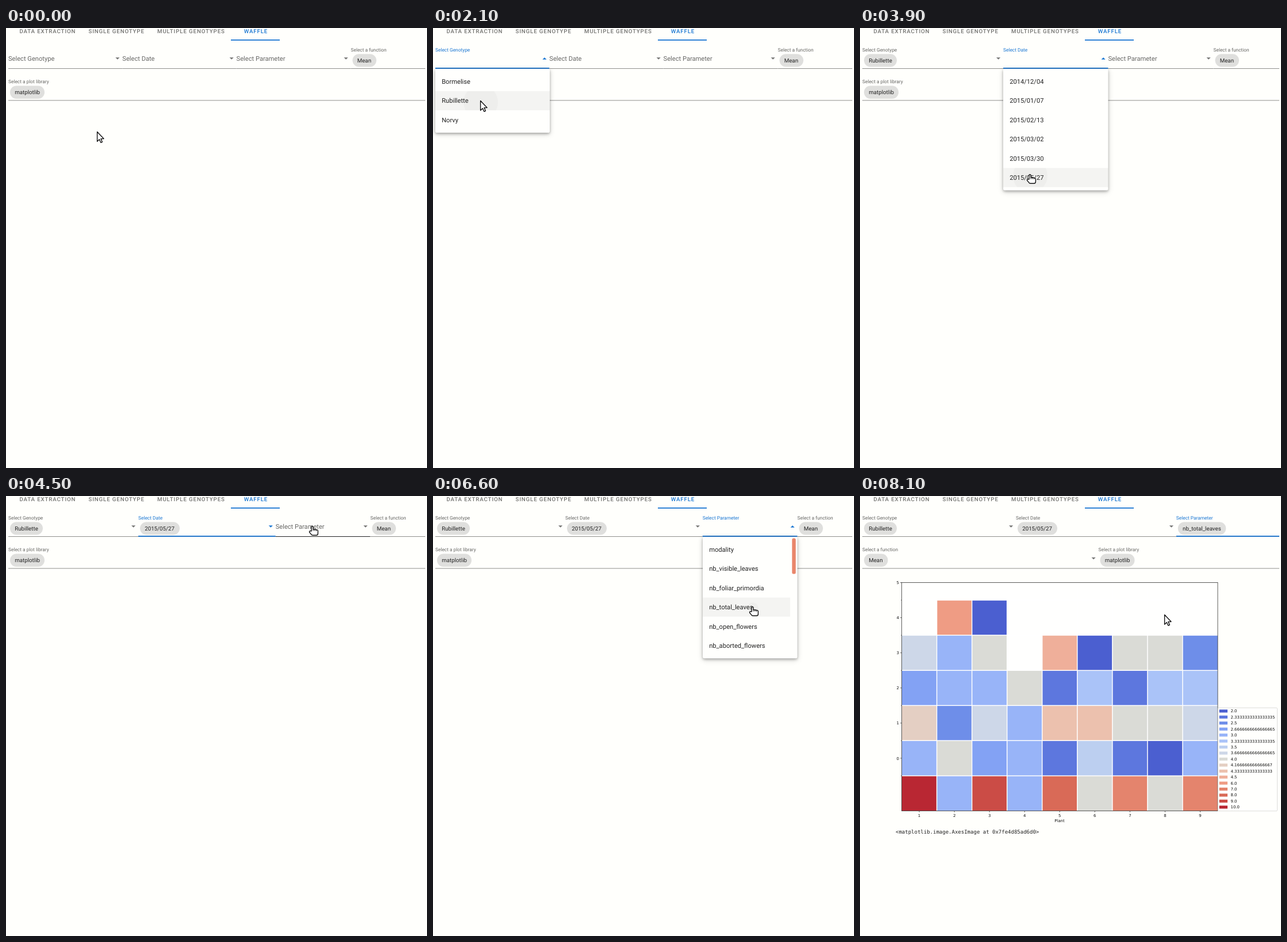
An HTML page for the animation above (8.7 s loop, 732 by 765 pixels).

```html
<!DOCTYPE html>
<html lang="en">
<head>
<meta charset="utf-8">
<title>Waffle plot form</title>
<style>
html, body { margin: 0; width: 100%; height: 100%; overflow: hidden; background: #fffffc; }
svg { display: block; width: 732px; height: 765px; font-family: Roboto, sans-serif; text-rendering: geometricPrecision; }
.tab { font-size: 9.74px; font-weight: 500; letter-spacing: .87px; fill: #747472; }
.chip { font-size: 9.74px; fill: #222; }
.item { font-size: 11.14px; fill: #222; }
.plot { font-family: "DejaVu Sans", sans-serif; font-size: 6.92px; fill: #111; }
.mono { font-family: "DejaVu Sans Mono", monospace; font-size: 9px; fill: #222; white-space: pre; }
.paper { filter: drop-shadow(0 2px 2px rgba(0,0,0,.24)) drop-shadow(0 2px 4px rgba(0,0,0,.2)); }
</style>
</head>
<body>
<svg viewBox="0 0 732 765" id="stage">
  <g id="tabs"></g><g id="plot"></g><g id="form"></g><g id="menus"></g><g id="cursor"></g>
</svg>
<script>
const LOOP = 8700, STEP = 100;
const BLUE = '#1976d2', GREY = '#676765', DARK = '#222', RIGHT = 729;
const ROW_GAP = 55.4, ITEM_H = 33.4, LIST_TOP = 76.3;
const el = id => document.getElementById(id);
const clamp = v => Math.max(0, Math.min(1, v));
const ramp = (t, from, len) => clamp((t - from) / len);
const ease = u => u * u * (3 - 2 * u);
const easeOut = u => 1 - (1 - u) ** 3;
const mix = (a, b, u) => a + (b - a) * u;

const esc = s => String(s).replace(/</g, '&lt;').replace(/>/g, '&gt;');
const rect = (x, y, w, h, fill, more = '') =>
  `<rect x="${x}" y="${y}" width="${w}" height="${h}" fill="${fill}" ${more}/>`;
const text = (x, y, s, cls, more = '') => `<text x="${x}" y="${y}" class="${cls}" ${more}>${esc(s)}</text>`;

// Column starts before and after each choice
const COLS = [[4, 202.3, 400.6, 599.5], [4, 249, 431.5, 614.5], [4, 230, 468.7, 633.5], [4, 271, 549.8]];
const PICKED = [2200, 4000, 6700];
const FIELDS = [
  { label: 'Select Genotype', chip: 'Rubillette', w: 57, focus: 1100, blur: 2900 },
  { label: 'Select Date', chip: '2015/05/27', w: 69, focus: 2900, blur: 4700 },
  { label: 'Select Parameter', chip: 'nb_total_leaves', w: 83.5, focus: 4700, blur: 99999 },
  { label: 'Select a function', chip: 'Mean', w: 41.5 },
  { label: 'Select a plot library', chip: 'matplotlib', w: 60 }
];
const MENUS = [
  { x: 4, w: 199, open: 1100, press: 2000, close: 2100, items: ['Bormelise', 'Rubillette', 'Norvy'] },
  { x: 249, w: 182.5, open: 2900, press: 3800, close: 4000,
    items: ['2014/12/04', '2015/01/07', '2015/02/13', '2015/03/02', '2015/03/30', '2015/05/27'] },
  { x: 469, w: 164.5, open: 4700, press: 6600, close: 6700, bar: true,
    items: ['modality', 'nb_visible_leaves', 'nb_foliar_primordia', 'nb_total_leaves', 'nb_open_flowers', 'nb_aborted_flowers'] }
];
// Pointer path: time, x, y
const PATH = [
  [0, 158, 180], [100, 158, 178], [200, 158, 178], [800, 112, 63], [1100, 112, 63], [1700, 85, 124],
  [1800, 85, 124], [2000, 82, 126], [2100, 82, 126], [2800, 296, 55], [3000, 296, 55], [3600, 294, 250],
  [3800, 295, 254], [3900, 295, 254], [4500, 532, 52], [4800, 533, 53], [5400, 509, 195], [5500, 509, 195],
  [5600, 511, 194], [5700, 511, 194], [5800, 520, 170], [6000, 524, 166], [6100, 524, 166], [6400, 555, 192],
  [6700, 555, 192], [7300, 528, 209], [7800, 528, 209], [7900, 527, 211], [8000, 527, 211], [8100, 529, 206],
  [LOOP, 529, 206]
];

function pointer(t) {
  const i = Math.max(1, PATH.findIndex(k => k[0] >= t));
  const a = PATH[i - 1], b = PATH[i], u = ease(ramp(t, a[0], b[0] - a[0]));
  return { x: mix(a[1], b[1], u), y: mix(a[2], b[2], u) };
}

function layout(t) {
  const stage = PICKED.filter(p => t >= p).length, c = COLS[stage];
  const cells = c.map((x, i) => ({ x, end: c[i + 1] || RIGHT, dy: 0 }));
  if (stage === 3) cells.push({ x: 4, end: 414.5, dy: ROW_GAP }, { x: 414.5, end: RIGHT, dy: ROW_GAP });
  else cells.push({ x: 4, end: RIGHT, dy: ROW_GAP });
  return cells;
}

const overField = (p, c) => p.x >= c.x && p.x < c.end && p.y >= 30 + c.dy && p.y < 71 + c.dy;
const listEnd = m => LIST_TOP + m.items.length * ITEM_H;
const overList = (p, m) => p.x >= m.x && p.x < m.x + m.w && p.y >= LIST_TOP && p.y < listEnd(m);
const itemAt = (p, m) => overList(p, m) ? Math.floor((p.y - LIST_TOP) / ITEM_H) : -1;
const menuShow = (m, t) => t < m.close ? ramp(t, m.open, 200) : 1 - ramp(t, m.close, 250);

function drawField(f, c, i, t, hover) {
  const focused = t >= f.focus && t < f.blur;
  const chosen = i > 2 || t >= PICKED[i];
  const color = focused ? BLUE : GREY;
  const up = i > 2 || chosen ? 1 : easeOut(ramp(t, f.focus, 300));
  let s = rect(c.x, 70 + c.dy, c.end - c.x, 1, hover ? DARK : '#8f8f8d');
  const grow = focused ? easeOut(ramp(t, f.focus, 300)) : t >= f.blur ? 1 - easeOut(ramp(t, f.blur, 300)) : 0;
  if (grow > 0) {
    const w = (c.end - c.x) * grow;
    s += rect((c.x + c.end - w) / 2, 69 + c.dy, w, 1.8, BLUE);
  }
  s += text(c.x, mix(57, 41, up) + c.dy, f.label, '', `font-size="${mix(11.14, 8.35, up)}" fill="${color}"`);
  if (chosen) {
    s += rect(c.x + 3, 45.2 + c.dy, f.w, 22.3, '#dfdfdd', 'rx="11.15"');
    s += text(c.x + 11.2, 60 + c.dy, f.chip, 'chip');
  }
  if (c.end < RIGHT) {
    const m = MENUS[i];
    const turn = m ? 180 * (easeOut(ramp(t, m.open, 300)) - easeOut(ramp(t, m.close, 300))) : 0;
    s += `<path transform="translate(${c.end - 8.4} ${53 + c.dy}) rotate(${turn})" d="M-3.6-1.7h7.2L0 1.8z" fill="${focused ? BLUE : '#757573'}"/>`;
  }
  return s;
}

function drawMenu(m, n, t) {
  const show = menuShow(m, t);
  if (show <= 0) return '';
  const held = Math.min(t, m.close), w = m.bar ? m.w - 12.5 : m.w;
  let s = rect(m.x, 71, m.w, listEnd(m) + 5.6 - 71, '#fffffd', 'rx="2.8" class="paper"');
  m.items.forEach((name, i) => {
    const y = LIST_TOP + i * ITEM_H;
    let lit = 0;
    for (let k = 0; k < 4; k++) {
      const at = held - k * 75;
      if (at > m.open + 100 && itemAt(pointer(at), m) === i) lit += .25;
    }
    if (lit) s += rect(m.x, y, w, ITEM_H, '#000', `opacity="${.045 * lit}"`);
    const p = pointer(m.press);
    if (t >= m.press && itemAt(p, m) === i) {
      s += `<clipPath id="row${n}">${rect(m.x, y, w, ITEM_H, '#000')}</clipPath>`;
      s += `<circle cx="${p.x + 1}" cy="${p.y + 3}" r="${10 + (t - m.press) / 5}" opacity=".025" clip-path="url(#row${n})"/>`;
    }
    s += text(m.x + 11.2, y + 20.7, name, 'item');
  });
  if (m.bar) s += rect(624.3, 73.5, 6.4, 62, '#e9866b', 'rx="2.5"');
  return `<g opacity="${show}">${s}</g>`;
}

const ARROW = '<path d="M.6.6V17.2L4.3 13.8 6.9 19.3 9.4 18.2 7 12.6H12z" fill="#fff" stroke="#111" stroke-width="1.4" stroke-linejoin="round"/>';
const HAND = '<path d="M-1 9V2Q-1 .7.5.7T2 2V6.2Q3.5 5.2 4.8 6.4 6.2 5.5 7.4 6.8 10.2 6.2 10.4 8.8V13Q10.4 16.3 7.5 16.3H1.5Q-.5 16.3-1.6 14.4L-4.4 11Q-4.8 8.6-2.6 8.6z" fill="#fff" stroke="#111" stroke-width="1.4" stroke-linejoin="round"/>' +
  '<path d="M2.1 7v1.8M4.9 7v1.8M7.6 7.4v1.6" stroke="#111" stroke-width="1"/>';

// Waffle data: each letter picks a value
const VALUES = ['2.0', '2.3333333333333335', '2.5', '2.6666666666666665', '3.0', '3.3333333333333335', '3.5',
  '3.6666666666666665', '4.0', '4.166666666666667', '4.333333333333333', '4.5', '6.0', '7.0', '8.0', '9.0', '10.0'];
const COLORS = ('4b5fd0 5d77de 6e8ee9 83a2f4 98b4f8 aac3f8 bccff0 cdd7e8 dadbd6 ' +
  'e4cfc3 ecc1ae efaf9a ef9c84 e4846d d96a57 cb4c46 b92733').split(' ').map(c => '#' + c);
const WAFFLE = ['.ma......', 'hei.laiic', 'deeibfbff', 'jchekkiih', 'eidebgbae', 'qepeoinin'];

function drawPlot() {
  const L = 72.5, T = 150.5, W = 549.5, H = 397, cw = W / 9, ch = 61.08, top = T + ch / 2;
  const line = (x1, y1, x2, y2, c, w) => `<path d="M${x1} ${y1}L${x2} ${y2}" stroke="${c}" stroke-width="${w}"/>`;
  let s = rect(L, T, W, H, '#fffffe');
  WAFFLE.forEach((row, r) => [...row].forEach((k, c) => {
    if (k !== '.') s += rect(L + c * cw, top + r * ch, cw, ch, COLORS[k.charCodeAt(0) - 97]);
  }));
  for (let i = 0; i < 9; i++) {
    const x = L + (i + .5) * cw;
    if (i) s += line(L + i * cw, T, L + i * cw, T + H, '#fff', 1.5);
    s += line(x, T + H, x, T + H + 2.5, '#222', .7) + text(x, 558, i + 1, 'plot', 'text-anchor="middle"');
  }
  for (let i = 0; i < 6; i++) {
    const y = T + i * ch;
    s += line(L, top + i * ch, L + W, top + i * ch, '#fff', 1.5);
    s += line(L - 1.5, top + i * ch, L, top + i * ch, '#222', .6);
    s += line(L - 2.5, y, L, y, '#222', .7) + text(68, y + 2.6, 5 - i, 'plot', 'text-anchor="end"');
  }
  s += rect(L, T, W, H, 'none', 'stroke="#333" stroke-width=".8"');
  s += text(347, 567.3, 'Plant', 'plot', 'text-anchor="middle"');
  s += rect(622.3, 368.3, 103.2, 179.4, '#fffffd', 'rx="1.5" stroke="#d4d4d2" stroke-width=".8"');
  VALUES.forEach((v, i) => {
    const y = 373.9 + i * 10.44;
    s += rect(624.7, y - 2.6, 14.3, 5.2, COLORS[i]) + text(644.5, y + 2.4, v, 'plot');
  });
  return s + text(62, 586.5, '<matplotlib.image.AxesImage at 0x7fe4d85ad6d0>', 'mono');
}

el('tabs').innerHTML = [['DATA EXTRACTION', 23.4], ['SINGLE GENOTYPE', 143.4], ['MULTIPLE GENOTYPES', 263], ['WAFFLE', 413.7]]
  .map(([s, x]) => text(x, 9.4, s, 'tab', s === 'WAFFLE' ? `style="fill:${BLUE}"` : '')).join('') +
  rect(391, 20, 85, 1.8, BLUE);
el('plot').innerHTML = drawPlot();

function draw(t) {
  const p = pointer(t), cells = layout(t);
  const menu = MENUS.find(m => t >= m.open && menuShow(m, t) > 0 || t === m.open);
  const inMenu = menu && overList(p, menu);
  const hovered = inMenu ? -1 : cells.findIndex(c => overField(p, c));
  const hand = inMenu ? t < menu.close : hovered >= 0;
  el('plot').style.display = t >= 7400 ? '' : 'none';
  el('form').innerHTML = FIELDS.map((f, i) => drawField(f, cells[i], i, t, i === hovered)).join('');
  el('menus').innerHTML = MENUS.map((m, n) => drawMenu(m, n, t)).join('');
  el('cursor').innerHTML = `<g transform="translate(${p.x} ${p.y})">${hand ? HAND : ARROW}</g>`;
}

let last = -1;
const begin = performance.now();
function tick() {
  const t = Math.floor((performance.now() - begin) % LOOP / STEP) * STEP;
  if (t !== last) draw(last = t);
  requestAnimationFrame(tick);
}
tick();
</script>
</body>
</html>
```
